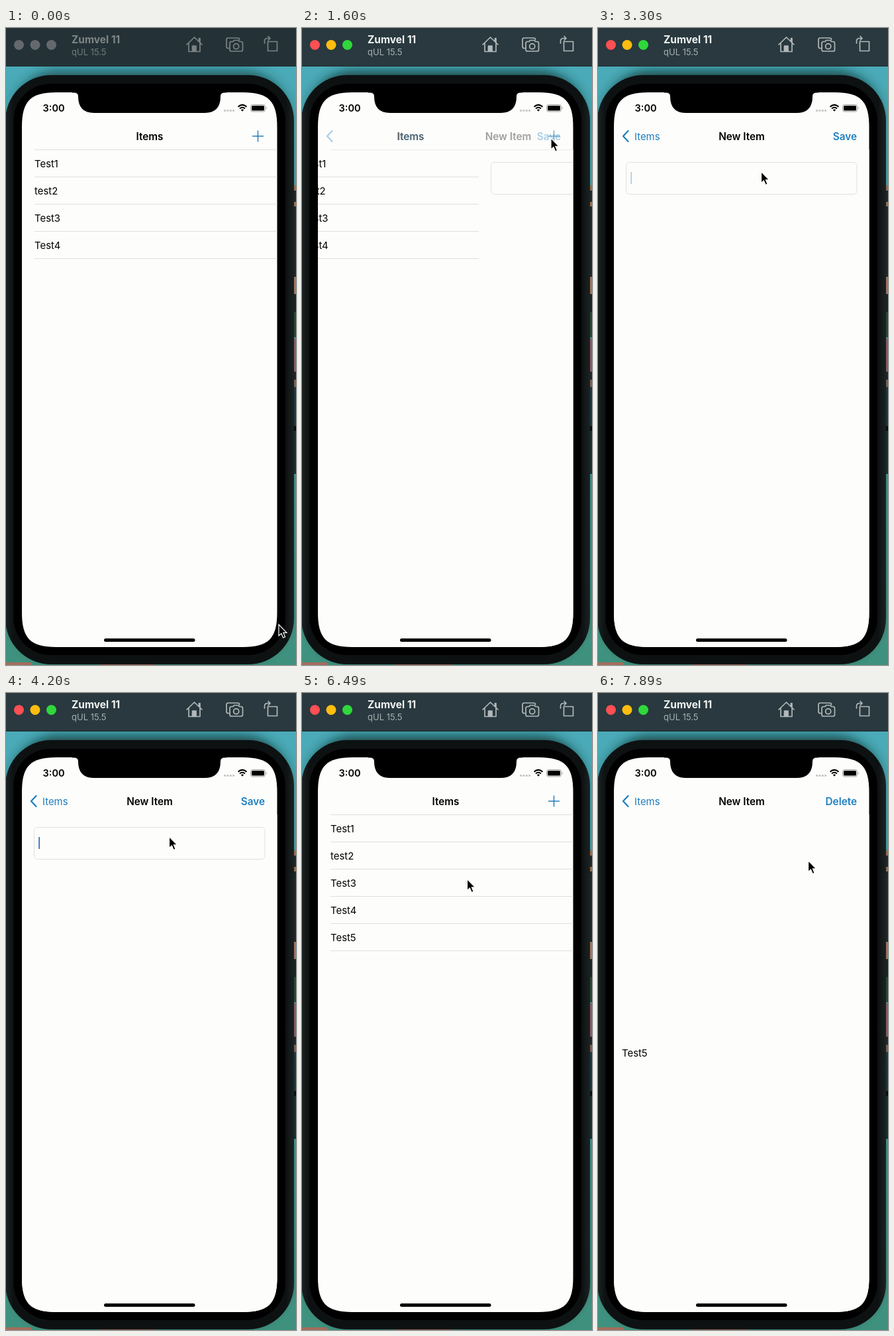
Recreate the animation shown at these times as an HTML page. Size 438 by 960 pixels, loop 7.99 s.

```html
<!DOCTYPE html>
<html lang="en">
<head>
<meta charset="utf-8">
<title>Items app</title>
<style>
  html, body { margin: 0; width: 100%; height: 100%; overflow: hidden; background: #439994; }
  svg { display: block; width: 438px; height: 960px; font: 14.9px Inter, "Open Sans", sans-serif; }
  .bold { font-weight: 600; font-size: 15.3px; }
  .blue { fill: #1d7fc0; }
  .paper { fill: #fdfdfb; }
  .line { stroke: #dfdfdb; fill: none; }
  .icon { fill: none; stroke: currentColor; stroke-width: 1.7; stroke-linejoin: round; stroke-linecap: round; }
</style>
</head>
<body>
<svg viewBox="0 0 438 960">
  <defs>
    <clipPath id="screen"><path d="M24 149C24 110 37 97 76 97H357.500C396.500 97 409.500 110 409.500 149V881C409.500 920 396.500 933 357.500 933H76C37 933 24 920 24 881Z"/></clipPath>
    <filter id="blur" x="-10%" y="-10%" width="120%" height="120%"><feGaussianBlur stdDeviation="9"/></filter>
    <linearGradient id="metal" x2="1" y2="0">
      <stop stop-color="#1c2223"/><stop offset=".028" stop-color="#0d1112"/>
      <stop offset=".972" stop-color="#0d1112"/><stop offset="1" stop-color="#1c2223"/>
    </linearGradient>
    <linearGradient id="wallpaper" x2="0" y2="1">
      <stop stop-color="#4bacbc"/><stop offset="1" stop-color="#3f917e"/>
    </linearGradient>
  </defs>

  <!-- desktop -->
  <rect width="438" height="960" fill="url(#wallpaper)"/>
  <g id="strip"></g>
  <path d="M0 956H38V960H0ZM141 957H226V960H141Z" fill="#a56d5d"/>
  <rect id="shadow" x="10" y="66" width="416" height="884" rx="68" fill="#102d2c" filter="url(#blur)"/>

  <!-- simulator toolbar -->
  <rect id="bar" width="438" height="58"/>
  <path d="M0 57.500H438" stroke="#1c282c"/>
  <g id="lights"><circle cx="19.500" cy="25.500" r="7.500"/><circle cx="44" cy="25.500" r="7.500"/><circle cx="68.500" cy="25.500" r="7.500"/></g>
  <text id="device" x="99" y="23" font-size="15.500" font-weight="700">Zumvel 11</text>
  <text id="system" x="99" y="40.500" font-size="13">qUL 15.5</text>
  <g id="icons" class="icon">
    <path d="M273 25L284.500 14L296 25M276 23V35.500H293V23M291.500 20V15.500H293V22"/>
    <path d="M281.500 35V27H287V35Z" fill="currentColor"/>
    <path d="M337 30.500H335.500Q333 30.500 333 28V17.500Q333 15 335.500 15H350Q352.500 15 352.500 17.500"/>
    <path d="M340.500 20.500H343L344.500 18.500H351L352.500 20.500H355Q357.500 20.500 357.500 23V32.500Q357.500 35 355 35H340.500Q338 35 338 32.500V23Q338 20.500 340.500 20.500Z"/>
    <circle cx="347.700" cy="27.700" r="4"/>
    <path d="M395.500 20.500H409.500V34.500H395.500ZM390.500 23V20Q390.500 15.500 395 15.500H398.500M396 12.500L399 15.500L396 18.500"/>
  </g>

  <!-- phone -->
  <rect x="-1" y="71" width="436" height="888" rx="69" fill="url(#metal)"/>
  <rect x="11.500" y="84" width="410.500" height="861" rx="56"/>
  <g clip-path="url(#screen)">
    <rect class="paper" x="24" y="97" width="386" height="836"/>
    <g id="list"></g>
    <g id="page">
      <rect class="paper" x="24" y="183" width="386" height="750"/>
      <g id="form">
        <rect class="line" x="42.500" y="202.500" width="348.500" height="48" rx="5"/>
        <text id="typed" x="49.500" y="230.500" font-size="12.200"></text>
        <rect id="caret" y="217" width="1.700" height="18" fill="#2c6fb5"/>
      </g>
      <text id="detail" x="36" y="547.500">Test5</text>
    </g>
    <path id="navLine" class="line" d="M43 183.500H410"/>
    <text id="listTitle" class="bold" x="217" y="168.500" text-anchor="middle">Items</text>
    <path id="plus" d="M372 163H389M380.500 154.500V171.500" stroke="#2a80b8" stroke-width="1.500"/>
    <g id="pageNav">
      <path d="M45.500 155L38 163L45.500 171" fill="none" stroke="#1d7fc0" stroke-width="2.200" stroke-linecap="round" stroke-linejoin="round"/>
      <text id="back" class="blue" x="55" y="168.500">Items</text>
      <text id="pageTitle" class="bold" x="217" y="168.500" text-anchor="middle">New Item</text>
      <text id="action" class="bold blue" x="391" y="168.500" text-anchor="end"></text>
    </g>
    <text x="55.500" y="126" font-weight="600" font-size="14.600">3:00</text>
    <path d="M329 124.500H345" stroke="#c2c2bf" stroke-width="2.500" stroke-dasharray="3 1.400"/>
    <path d="M350.500 118.700Q357 113 363.500 118.700M353 121.500Q357 118 361 121.500" fill="none" stroke="#000" stroke-width="2.100"/>
    <path d="M354.800 123.300Q357 121.500 359.200 123.300L357 125.700Z"/>
    <rect x="369.500" y="115.500" width="22" height="10.500" rx="3" fill="none" stroke="#999996"/>
    <rect x="371" y="117" width="19" height="7.500" rx="1.600"/>
    <path d="M393 119Q395 120.700 393 122.500Z" fill="#999996"/>
    <rect x="148" y="920" width="137.500" height="5" rx="2.500"/>
  </g>
  <path d="M100 96V97.500H103Q109 97.500 109 103Q109 128 133 128H300Q324 128 324 103Q324 97.500 330 97.500H333V96Z"/>
  <path id="cursor" d="M0 0V17L3.900 13.500L6.700 20L9.600 18.700L6.900 12.400H12Z" stroke="#fff" stroke-width="1.200"/>
</svg>

<script>
const LOOP = 7990;
const $ = id => document.getElementById(id);
const set = (id, attrs) => { for (const k in attrs) $(id).setAttribute(k, attrs[k]); };
const shift = (id, x, y = 0) => set(id, { transform: `translate(${x} ${y})` });
const progress = (t, from, to) => Math.min(1, Math.max(0, (t - from) / (to - from)));
const easeOut = x => 1 - (1 - x) ** 3;
const smooth = x => x * x * (3 - 2 * x);

// Wallpaper slivers right of the phone: top, bottom, colour
$('strip').innerHTML = [
  [237, 245, '#a8744e'], [245, 262, '#22282a'], [262, 269, '#a8744e'], [269, 375, '#20282a'],
  [375, 401, '#b07c62'], [401, 428, '#1a2422'], [428, 466, '#2c4a34'], [468, 518, '#96606c'],
  [518, 530, '#262628'], [530, 541, '#8a6258'], [541, 600, '#203a40'], [600, 607, '#060808'],
  [607, 672, '#1a3030']
].map(([a, b, c]) => `<rect x="430" y="${a}" width="8" height="${b - a}" fill="${c}"/>`).join('');

$('list').innerHTML = ['Test1', 'test2', 'Test3', 'Test4', 'Test5'].map((label, i) =>
  `<g><text x="43" y="${209.5 + 41 * i}">${label}</text>
   <path class="line" d="M43 ${224.5 + 41 * i}H410"/></g>`).join('');
const lastRow = $('list').lastElementChild;

// Pointer path: time, x, y
const pointer = [
  [100, 412, 899], [900, 364, 178], [1200, 376, 166], [1700, 376, 166], [2100, 346, 186],
  [2700, 246.5, 216.5], [5400, 246.5, 216.5], [5700, 371, 166], [5900, 371, 166], [6500, 249.5, 280.5],
  [6800, 250, 364], [7200, 250, 364], [7900, 317.5, 252.5]
];

function pointerAt(t) {
  const next = pointer.findIndex(p => p[0] > t);
  if (next === 0) return pointer[0].slice(1);
  if (next < 0) return pointer.at(-1).slice(1);
  const [t0, x0, y0] = pointer[next - 1], [t1, x1, y1] = pointer[next];
  const k = smooth(progress(t, t0, t1));
  return [x0 + (x1 - x0) * k, y0 + (y1 - y0) * k];
}

function caretOpacity(t) {
  if (t < 2900) return 0;
  if (t >= 4200) return 1;
  const phase = (t - 2900) % 1000;
  return phase < 350 ? 1 : phase < 500 ? 0.35 : phase < 850 ? 0 : 0.5;
}

function paintWindow(active) {
  const lights = active ? ['#fc5054', '#ffbd10', '#30d83c'] : Array(3).fill('#65696d');
  [...$('lights').children].forEach((c, i) => c.setAttribute('fill', lights[i]));
  set('shadow', { opacity: active ? 0.9 : 0.75 });
  set('bar', { fill: active ? '#29393f' : '#243237' });
  set('device', { fill: active ? '#f3f5f3' : '#7f8688' });
  set('system', { fill: active ? '#a9b1b2' : '#737b7d' });
  set('icons', { color: active ? '#b2b8b9' : '#7b8385' });
}

function render(t) {
  paintWindow(t >= 1500);

  const viewing = t >= 6500;
  const open = viewing ? easeOut(progress(t, 7000, 7700))
    : easeOut(progress(t, 1500, 2200)) - easeOut(progress(t, 5800, 6400));
  shift('list', -115 * open);
  shift('page', 386 * (1 - open));
  set('page', { visibility: open > 0 ? 'visible' : 'hidden' });
  lastRow.setAttribute('visibility', t >= 5800 ? 'visible' : 'hidden');

  for (const id of ['navLine', 'listTitle', 'plus']) set(id, { opacity: 1 - open });
  shift('listTitle', -143 * open);
  set('pageNav', { opacity: open });
  shift('back', 143 * (1 - open));
  shift('pageTitle', 150 * (1 - open));
  $('action').textContent = viewing ? 'Delete' : 'Save';

  set('form', { visibility: viewing ? 'hidden' : 'inherit' });
  set('detail', { visibility: viewing ? 'inherit' : 'hidden' });
  const typed = $('typed');
  typed.textContent = 'Test5'.slice(0, [4300, 4500, 4700, 4900, 5300].filter(k => t >= k).length);
  const width = typed.textContent ? typed.getComputedTextLength() : 0;
  set('caret', { x: 49.3 + width, opacity: caretOpacity(t) });

  shift('cursor', ...pointerAt(t));
}

function tick() {
  const t = performance.now() % LOOP;
  render(Math.floor((t + 12) / 100) * 100);
  requestAnimationFrame(tick);
}
tick();
</script>
</body>
</html>
```
